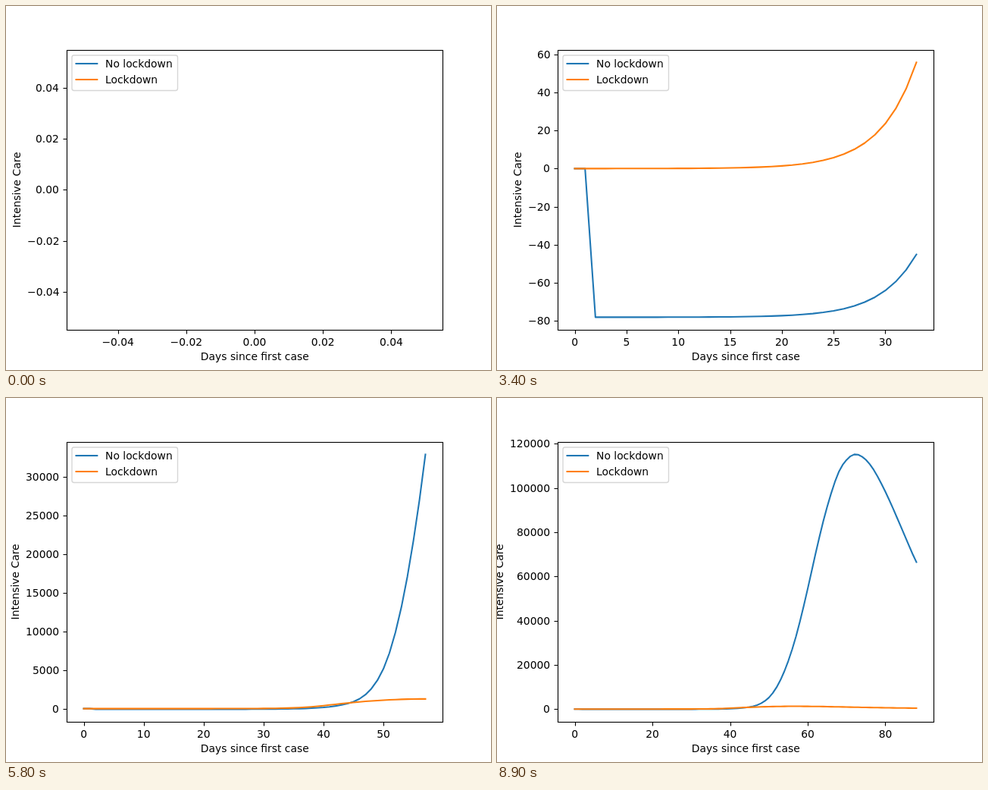
Write an HTML page with a canvas that moves like this. It is 640 px wide and 480 px high and loops after 9 s.

```html
<!DOCTYPE html>
<html lang="en">
<head>
<meta charset="utf-8">
<title>Intensive care with and without lockdown</title>
<style>
html, body { margin: 0; width: 100%; height: 100%; overflow: hidden; background: #fff; }
canvas { display: block; }
</style>
</head>
<body>
<canvas width="640" height="480"></canvas>
<script>
const ctx = document.querySelector('canvas').getContext('2d');
const LOOP = 9000, STEP = 100;
const BLUE = '#1f77b4', ORANGE = '#ff7f0e';
const LEFT = 80, RIGHT = 576, TOP = 57.6, BOTTOM = 427.2;

// [day, patients]; the blue curve lies 78 below these values
const free = [[2, .0049], [24, 2.53], [36, 77], [39, 179], [42, 419.6], [43, 552], [44, 733],
  [45, 973], [46, 1338], [48, 2668], [50, 5241], [52, 9950], [54, 17200], [57, 32983],
  [60, 54450], [62, 70200], [64, 84900], [66, 97400], [68, 107280], [70, 112750], [72, 115234],
  [74, 114230], [76, 110800], [80, 98380], [84, 82600], [88, 66510]];
const locked = [[2, .0083], [24, 4.31], [30, 23.6], [36, 131], [38, 230], [40, 381], [42, 558.6],
  [45, 800], [50, 1090], [55, 1240], [60, 1215], [68, 990], [78, 640], [88, 400]];

// Cubic Hermite curve through the logarithms of the knots
function curve(knots) {
  const p = knots.map(([x, y]) => [x, Math.log(y)]), last = p.length - 1;
  const secant = i => (p[i + 1][1] - p[i][1]) / (p[i + 1][0] - p[i][0]);
  const tangent = i => {
    if (i === 0) return secant(0);
    if (i === last) return secant(last - 1);
    const a = p[i][0] - p[i - 1][0], b = p[i + 1][0] - p[i][0];
    return (b * secant(i - 1) + a * secant(i)) / (a + b);
  };
  return x => {
    let i = 0;
    while (i < last - 1 && x > p[i + 1][0]) i++;
    const h = p[i + 1][0] - p[i][0], u = (x - p[i][0]) / h, v = 1 - u;
    return Math.exp(v * v * (1 + 2 * u) * p[i][1] + u * u * (3 - 2 * u) * p[i + 1][1]
      + h * u * v * (v * tangent(i) - u * tangent(i + 1)));
  };
}

const freeAt = curve(free), lockedAt = curve(locked);
const days = Array.from({ length: 89 }, (_, d) => d);
const blue = days.map(d => d < 2 ? d * .0012 : freeAt(d) - 78);
const orange = days.map(d => d < 2 ? d * .0012 : lockedAt(d));

// Visible range with 5% margins, and round ticks at most nine steps apart
function axis(min, max) {
  if (min === max) { min = -.05; max = .05; }
  const pad = (max - min) * .05, lo = min - pad, hi = max + pad;
  const raw = (hi - lo) / 9, unit = 10 ** Math.floor(Math.log10(raw));
  const factor = [1, 2, 2.5, 5, 10].find(f => f * unit >= raw * .999999);
  const step = factor * unit;
  const places = Math.max(0, -Math.floor(Math.log10(step) + 1e-9) + (factor === 2.5 ? 1 : 0));
  const ticks = [];
  for (let k = Math.ceil(lo / step); k * step <= hi; k++) {
    const text = Math.abs(k * step).toFixed(places);
    ticks.push({ value: k * step, text: (k < 0 ? '\u2212' : '') + text });
  }
  return { lo, hi, ticks };
}

function stroke(points, color, width) {
  ctx.beginPath();
  points.forEach(([x, y]) => ctx.lineTo(x, y));
  ctx.strokeStyle = color;
  ctx.lineWidth = width;
  ctx.stroke();
}

function legend() {
  ctx.beginPath();
  ctx.roundRect(87, 65, 139.5, 46.5, 2.8);
  ctx.fillStyle = 'rgba(255,255,255,.8)';
  ctx.fill();
  ctx.strokeStyle = 'rgba(204,204,204,.8)';
  ctx.lineWidth = 1.39;
  ctx.stroke();
  ctx.textAlign = 'left';
  ctx.fillStyle = '#000';
  [['No lockdown', BLUE, 76], ['Lockdown', ORANGE, 97]].forEach(([text, color, y]) => {
    stroke([[92.5, y], [120.3, y]], color, 2.08);
    ctx.fillText(text, 131, y + 5);
  });
}

function draw(day) {
  const seenBlue = blue.slice(0, day + 1), seenOrange = orange.slice(0, day + 1);
  const all = seenBlue.concat(seenOrange);
  const xs = axis(day ? 0 : -.05, day || .05), ys = axis(Math.min(...all), Math.max(...all));
  const px = v => LEFT + (v - xs.lo) / (xs.hi - xs.lo) * (RIGHT - LEFT);
  const py = v => BOTTOM - (v - ys.lo) / (ys.hi - ys.lo) * (BOTTOM - TOP);

  ctx.fillStyle = '#fff';
  ctx.fillRect(0, 0, 640, 480);
  ctx.font = '13.889px "DejaVu Sans", sans-serif';
  ctx.fillStyle = '#000';
  ctx.lineCap = 'butt';

  ctx.textAlign = 'center';
  for (const { value, text } of xs.ticks) {
    const x = Math.round(px(value)) + .5;
    stroke([[x, 427.5], [x, 432.5]], '#000', 1.11);
    ctx.fillText(text, px(value), 448);
  }
  ctx.fillText('Days since first case', 328.3, 467);

  ctx.textAlign = 'left';
  let widest = 0;
  for (const { value, text } of ys.ticks) {
    const y = Math.round(py(value)) + .5, width = ctx.measureText(text).width;
    stroke([[75.5, y], [80.5, y]], '#000', 1.11);
    ctx.fillText(text, Math.round(70.3 - width), Math.round(py(value) + 5));
    widest = Math.max(widest, width);
  }

  ctx.save();
  ctx.translate(Math.round(61.4 - widest), 242.4);
  ctx.rotate(-Math.PI / 2);
  ctx.textAlign = 'center';
  ctx.fillText('Intensive Care', 0, 0);
  ctx.restore();

  ctx.lineCap = 'square';
  ctx.lineJoin = 'round';
  if (day) {
    stroke(seenBlue.map((v, d) => [px(d), py(v)]), BLUE, 2.08);
    stroke(seenOrange.map((v, d) => [px(d), py(v)]), ORANGE, 2.08);
  }
  ctx.lineJoin = 'miter';
  ctx.strokeStyle = '#000';
  ctx.lineWidth = 1.11;
  ctx.strokeRect(80.5, 58.5, 496, 369);
  legend();
}

const start = performance.now();
function tick() {
  const t = (performance.now() - start) % LOOP;
  draw(Math.max(0, Math.floor(t / STEP) - 1));
  requestAnimationFrame(tick);
}
tick();
</script>
</body>
</html>
```
